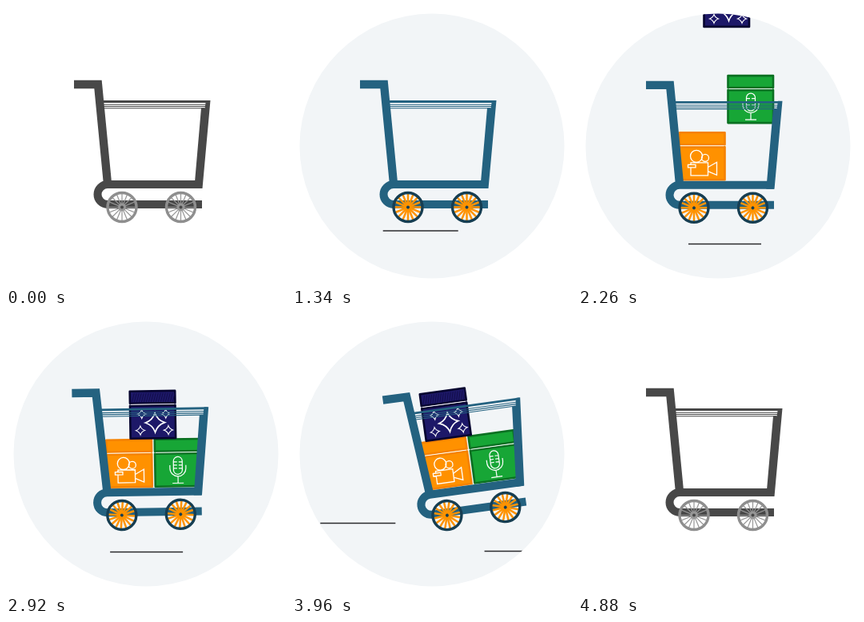
An HTML page with a canvas for the animation above (4.9 s loop, 350 px wide and 350 px high).

```html
<!DOCTYPE html>
<html>
<head>
<meta charset="utf-8">
<style>
html, body { margin: 0; width: 100%; height: 100%; overflow: hidden; background: #fff; }
canvas { display: block; width: 350px; height: 350px; }
</style>
</head>
<body>
<canvas id="stage" width="350" height="350"></canvas>
<script>
const c = document.getElementById('stage').getContext('2d');
const LOOP = 4900, TAU = Math.PI * 2;

const ramp = (t, a, b) => Math.min(1, Math.max(0, (t - a) / (b - a)));
const ease = (t, a, b) => (1 - Math.cos(Math.PI * ramp(t, a, b))) / 2;
const bump = (t, a, b) => Math.sin(Math.PI * ramp(t, a, b));

// Ground lines: y, then [time, left end] points
const LINES = [
  [297.5, [760, 288], [1220, -32]],
  [262, [900, 316], [1250, -62]],
  [281, [1095, 304], [1340, 114], [1900, -48]],
  [297.5, [1800, 288], [2180, 142], [2260, 138], [2920, 130.5], [3350, -32]],
  [288, [3468, 296], [3850, -42]],
  [281, [3640, 304], [3900, -48]],
  [261.5, [3785, 316], [3960, 37], [4020, -62]],
  [296.5, [3932, 287], [3960, 242], [4150, -32]]
];

function along(points, t) {
  for (let i = 1; i < points.length; i++) {
    const [t0, x0] = points[i - 1], [t1, x1] = points[i];
    if (t >= t0 && t <= t1) return x0 + (x1 - x0) * (t - t0) / (t1 - t0);
  }
  return null;
}

function stroke(d, color, width) {
  c.strokeStyle = color;
  c.lineWidth = width;
  c.stroke(new Path2D(d));
}

function disc(x, y, r, color) {
  c.fillStyle = color;
  c.beginPath();
  c.arc(x, y, r, 0, TAU);
  c.fill();
}

function turn(x, y, degrees) {
  c.translate(x, y);
  c.rotate(degrees * Math.PI / 180);
  c.translate(-x, -y);
}

const mix = (a, b, k) => `rgb(${a.map((v, i) => v + (b[i] - v) * k)})`;

function box(x, y, fill, edge) {
  c.fillStyle = fill;
  c.lineJoin = 'round';
  for (const [top, h] of [[0, 15], [18, 41]]) {
    c.fillRect(x, y + top, 56.5, h);
    stroke(`M${x} ${y + top}h56.500v${h}h-56.500z`, edge, 2.6);
  }
  stroke(`M${x + 1} ${y + 16.5}h54.500`, '#fff', 0.9);
  c.lineJoin = 'miter';
}

function camera() {
  box(127, 157.5, '#ff9100', '#f58200');
  stroke('M155.500 187a7.500 7.500 0 1 1 -15 0a7.500 7.500 0 1 1 15 0' +
    'M163.500 189a4.500 4.500 0 1 1 -9 0a4.500 4.500 0 1 1 9 0' +
    'M141 198V195H162.500V211H141V201M137.500 197.500h9.500v3.500h-9.500z' +
    'M163 200.500L173.500 194.500V210.500L163 206', '#fff', 1.3);
}

function microphone() {
  box(187.5, 157.5, '#17a636', '#0b7022');
  stroke('M210.500 185a5.500 5.500 0 0 1 11 0v11a5.500 5.500 0 0 1 -11 0z' +
    'M206 190v4a10 10 0 0 0 20 0v-4M216 204v8M209 212.500h14' +
    'M211 186h4M211 190h4M211 194h4M217 186h4M217 190h4M217 194h4', '#fff', 1.2);
}

function sparkle(x, y, r, width) {
  const k = r * 0.25;
  stroke(`M${x} ${y - r}Q${x + k} ${y - k} ${x + r} ${y}Q${x + k} ${y + k} ${x} ${y + r}` +
    `Q${x - k} ${y + k} ${x - r} ${y}Q${x - k} ${y - k} ${x} ${y - r}z`, '#fff', width);
}

function sparkles() {
  box(157.5, 97, '#1d1868', '#06042f');
  let hatch = '';
  for (let x = 160; x < 212; x += 3) hatch += `M${x} 110.500l3 -11`;
  stroke(hatch, '#120d4a', 1);
  sparkle(188.5, 136.5, 12, 1.7);
  for (const [x, y] of [[170, 146], [205, 146], [172, 125.5], [202, 125.5]]) sparkle(x, y, 5.5, 1.1);
}

// Each parcel: drawing, start of the fall, height of the fall, how far it slides in a tilt
const PARCELS = [[camera, 1755, 212, 4], [microphone, 1935, 212, 4], [sparkles, 2115, 151, 37]];
const FALL = 400;

function parcels(t) {
  const slip = ease(t, 2900, 3420) - ease(t, 3700, 4400);
  for (const [draw, start, height, slide] of PARCELS) {
    if (t < start) continue;
    c.save();
    c.translate(-slide * slip, -height * (1 - ramp(t, start, start + FALL) ** 2));
    draw();
    c.restore();
  }
}

function wheel(x, spin, tint) {
  const spoke = mix([150, 150, 150], [255, 147, 0], tint);
  const rim = mix([142, 142, 142], [22, 62, 82], tint);
  c.save();
  c.translate(x, 251.5);
  c.rotate(spin);
  for (let i = 0; i < 16; i++) {
    c.rotate(TAU / 16);
    stroke('M3 0H17', spoke, 1.2 + 1.3 * tint);
  }
  disc(0, 0, 5, spoke);
  disc(0, 0, 2, mix([72, 72, 72], [22, 62, 82], tint));
  c.strokeStyle = rim;
  c.lineWidth = 3.4;
  c.beginPath();
  c.arc(0, 0, 18, 0, TAU);
  c.stroke();
  c.restore();
}

function cart(spin, tint) {
  const steel = mix([72, 72, 72], [36, 98, 128], tint);
  stroke('M121 119.500H254', steel, 2.8);
  stroke('M121 123.200H249.500M121 125.500H249M121 127.800H248', steel, 1.1);
  stroke('M85 98H115L127 222', steel, 10.3);
  stroke('M245 223H127A12.500 12.500 0 0 0 127 248H245', steel, 10);
  c.fillStyle = steel;
  c.fill(new Path2D('M255.500 118L245.500 228H235.300L244 127.500H248.500L250 118z'));
  wheel(145, spin, tint);
  wheel(218.5, spin, tint);
}

function draw(t) {
  c.setTransform(1, 0, 0, 1, 0, 0);
  c.globalAlpha = 1;
  c.clearRect(0, 0, 350, 350);

  const waiting = t >= 4340;
  c.globalAlpha = waiting ? 1 - ramp(t, 4340, 4840) : ramp(t, 0, 500);
  disc(175, 175, 165.5, '#f2f5f7');
  c.globalAlpha = waiting ? ramp(t, 4360, 4880) : 1;
  const tint = waiting ? 0 : ramp(t, 0, 520);

  c.save();
  c.beginPath();
  c.arc(175, 175, 165.5, 0, TAU);
  c.clip();

  for (const [y, ...points] of LINES) {
    const x = along(points, t);
    if (x !== null) stroke(`M${x} ${y}h${y === 297.5 ? 91 : 94}`, '#2b2b2e', 1.6);
  }

  const tilt = 21.4 * (ease(t, 130, 900) - ease(t, 900, 1150) + ease(t, 2820, 3580) - ease(t, 3580, 4230));
  const tip = 10 * bump(t, 1150, 1335);
  const drive = waiting ? 0 : 284 * ramp(t, 3700, 4320) ** 2;
  const dip = PARCELS.reduce((sum, [, start]) => sum + bump(t, start + FALL, start + FALL + 150), 0);
  const spin = waiting ? 0 : 6 * TAU / 16 * (ease(t, 130, 1300) + ease(t, 2820, 3700)) + drive / 19;

  c.translate(drive, dip);
  turn(145, 262, -tilt);
  turn(218.5, 262, tip);
  if (!waiting) parcels(t);
  cart(spin, tint);
  c.restore();
}

function tick() {
  draw(performance.now() % LOOP);
  requestAnimationFrame(tick);
}
tick();
</script>
</body>
</html>
```
